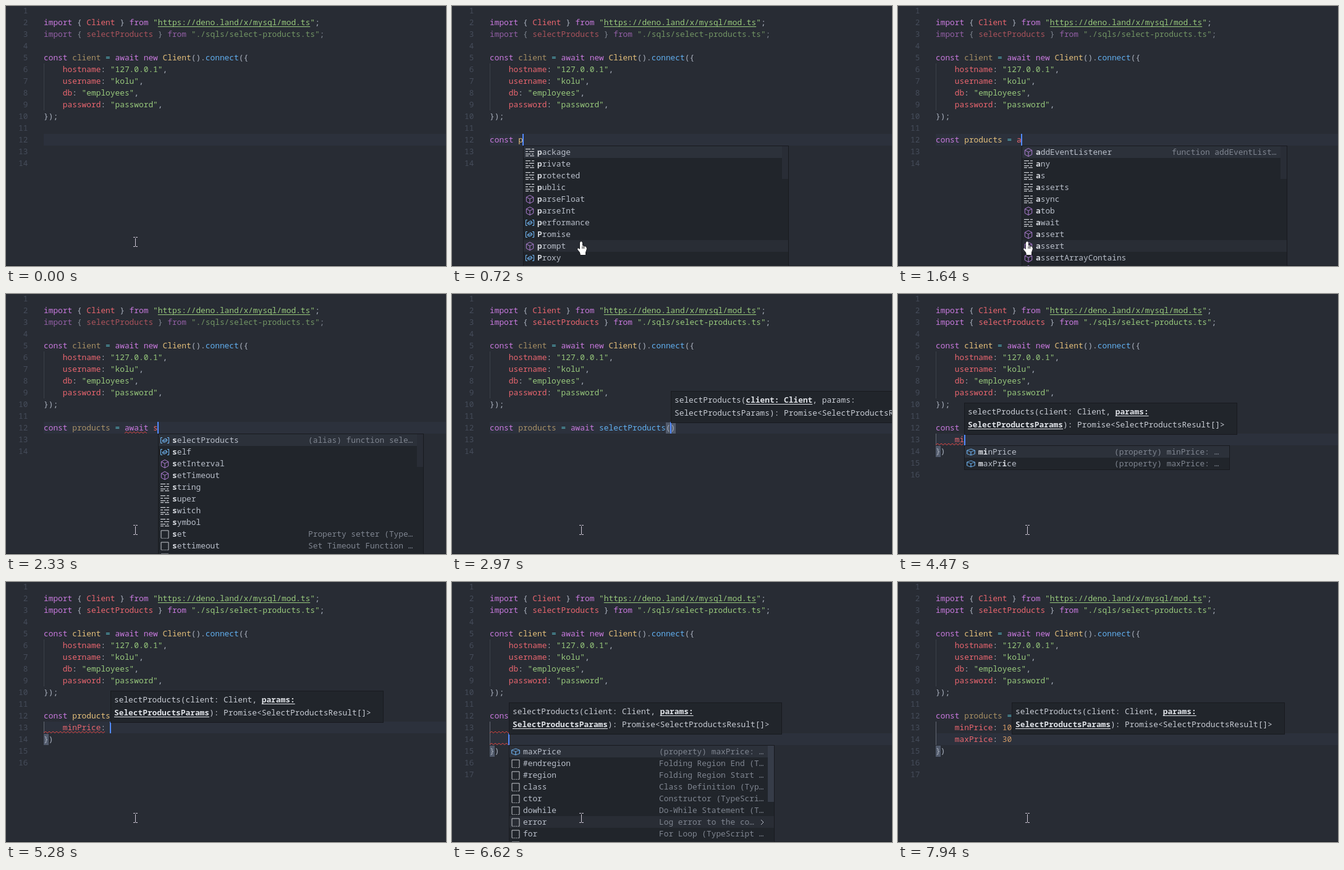
Recreate the animation shown at these times as an HTML page with a canvas. Size 712 by 421 pixels, loop 8 s.

```html
<!DOCTYPE html>
<html lang="en">
<head>
<meta charset="utf-8">
<title>Typing a typed query call</title>
<style>
html, body { margin: 0; width: 100%; height: 100%; overflow: hidden; background: #282c34; }
canvas { display: block; }
</style>
</head>
<body>
<canvas id="stage" width="712" height="421"></canvas>
<script>
const ctx = document.getElementById('stage').getContext('2d');
const LOOP = 8000, CW = 7.7, LH = 19, LEFT = 61;
const FONT = '12.83px "Noto Sans Mono", "DejaVu Sans Mono", monospace';
const COLORS = { K: '#c97adf', R: '#ea666f', G: '#98c97c', Y: '#e5c07b', B: '#61afef', T: '#56b6c2', O: '#d19a66', W: '#abb2bf' };

// Fixed lines: spans split by "|", first letter is the colour.
const HEAD = {
  2: 'Kimport |W{ |RClient|W } |Kfrom |G"https://deno.land/x/mysql/mod.ts"|W;',
  3: 'Kimport |W{ |RselectProducts|W } |Kfrom |G"./sqls/select-products.ts"|W;',
  5: 'Kconst |Yclient|T = |Kawait new |YClient|W().|Bconnect|W({',
  6: 'W    |Rhostname|W: |G"127.0.0.1"|W,',
  7: 'W    |Rusername|W: |G"kolu"|W,',
  8: 'W    |Rdb|W: |G"employees"|W,',
  9: 'W    |Rpassword|W: |G"password"|W,',
  10: 'W});'
};
const CALL = 'Kconst |Yproducts|T = |Kawait |BselectProducts|W(|Rclient|W, {';
const spans = s => s.split('|').map(p => [p[0], p.slice(1)]);

// Keystrokes: [time, inserted text]
const type = (str, ...times) => times.map((t, i) => [t, str[i]]);
const KEYS = [
  ...[...'const products'].map((c, i) => [340 + 57 * i, c]),
  ...type(' = await', 1250, 1370, 1480, 1600, 1720, 1800, 1900, 1990),
  ...type(' sele', 2180, 2290, 2370, 2400, 2440),
  [2630, 'ctProducts'], [2820, '('],
  ...type('client, {', 3280, 3360, 3430, 3490, 3550, 3590, 3970, 4010, 4060),
  [4120, '\n    '],
  ...type('min', 4280, 4420, 4560), [4780, 'Price'],
  ...type(': 10,', 5010, 5240, 5510, 5620, 5740),
  [5850, '\n    '],
  ...type('ma', 6660, 6730), [6890, 'xPrice'],
  ...type(': 30', 7040, 7200, 7630, 7700)
];

// Suggestions: [from, to, items]. Item: icon letter, label, optional "|detail"; *...* marks fixed bold.
const POPUPS = [
  [380, 625, 'kconst;kclass;kcontinue;kcase;kcatch;vclient;vClient;mclearInterval;mclearTimeout;mclose;mconfirm;vconsole'],
  [720, 1250, 'kpackage;kprivate;kprotected;kpublic;mparseFloat;mparseInt;vperformance;vPromise;mprompt;vProxy;vProgressEvent;vselectProducts'],
  [1640, 2180, 'maddEventListener|function addEventList…;kany;kas;kasserts;kasync;matob;kawait;massert;massert;massertArrayContains;massertEquals;massertMatch'],
  [2330, 2630, 'vselectProducts|(alias) function sele…;vself;msetInterval;msetTimeout;kstring;ksuper;kswitch;ksymbol;sset|Property setter (Type…;ssettimeout|Set Timeout Function …;sswitch case;mselectRole;mserverRelease;msessionRule;msendFile;msearchTitle;msetVisible'],
  [3320, 3970, 'vclient|   const client: Mysql;vClient;m*cle*ar*In*terval;vis*C*onso*leIn*stance;kclass;kconst;kcontinue;mclearTimeout;mclose;mconfirm;vconsole;vcrypto'],
  [4320, 4780, 'fminPrice|(property) minPrice: …;fmaxPrice|(property) maxPrice: …;smethod;simport statement'],
  [6390, 6890, 'fmaxPrice|(property) maxPrice: …;s#endregion|Folding Region End (T…;s#region|Folding Region Start …;sclass|Class Definition (Typ…;sctor|Constructor (TypeScri…;sdowhile|Do-While Statement (T…;serror|Log error to the co…;sfor|For Loop (TypeScript …;sforeach|For-Each Loop (TypeSc…;sforin|For-In Loop (TypeScri…;sfunction;sget']
];

const rowTop = row => (row - 1) * LH - 2;
const colX = col => LEFT + col * CW;
const within = (t, ...ranges) => ranges.some(([a, b]) => t >= a && t < b);

function rect(x, y, w, h, fill) {
  ctx.fillStyle = fill;
  ctx.fillRect(x, y, w, h);
}
function write(str, x, y, fill, bold) {
  ctx.fillStyle = fill;
  ctx.font = (bold ? 'bold ' : '') + FONT;
  [...str].forEach((c, i) => c !== ' ' && ctx.fillText(c, x + i * CW, y));
}
function code(row, col, color, str, alpha = 1) {
  ctx.globalAlpha = alpha;
  write(str, colX(col), rowTop(row) + 14, COLORS[color]);
  ctx.globalAlpha = 1;
}
function path(points, stroke, close) {
  ctx.beginPath();
  points.forEach(([x, y]) => ctx.lineTo(x, y));
  if (close) ctx.closePath();
  ctx.strokeStyle = stroke;
  ctx.stroke();
}
function squiggle(row, from, to) {
  const pts = [];
  for (let x = colX(from), i = 0; x <= colX(to); x += 3, i++) pts.push([x, rowTop(row) + (i % 2 ? 16 : 18.5)]);
  path(pts, '#dc4642');
}
function bracket(row, col) {
  rect(Math.round(colX(col)), rowTop(row) + 1, 8, LH - 1, '#515a6b');
}
function box(x, y, w, h) {
  rect(x, y, w, h, '#181a1f');
  rect(x + 1, y + 1, w - 2, h - 2, '#21252b');
}

function icon(kind, cx, cy) {
  ctx.save();
  ctx.translate(cx, cy);
  if (kind === 'm' || kind === 'f') {
    const color = kind === 'm' ? '#b180d7' : '#75beff';
    if (kind === 'f') ctx.scale(1.1, .78);
    path([[0, -6.5], [5.7, -3.5], [5.7, 3.5], [0, 6.5], [-5.7, 3.5], [-5.7, -3.5]], color, true);
    path([[-5.7, -3.5], [0, -.5], [5.7, -3.5]], color);
    path([[0, -.5], [0, 6.5]], color);
  } else if (kind === 'k') {
    [[-7, -6, 8], [3, -6, 4], [-7, -2, 4], [-1, -2, 8], [-7, 2, 8], [3, 2, 3], [-7, 5, 5], [0, 5, 7]]
      .forEach(([x, y, w]) => rect(x, y, w, 1.3, '#c5c8ce'));
  } else if (kind === 'v') {
    for (const s of [-1, 1]) path([[s * 4, -4.5], [s * 6.5, -4.5], [s * 6.5, 4.5], [s * 4, 4.5]], '#75beff');
    path([[-3.5, 0], [1, -3], [3.5, -1.5], [3.5, 1], [-1, 3.3], [-3.5, 2]], '#75beff', true);
    path([[-3.5, 0], [-1, 1.2], [3.5, -1.5]], '#75beff');
  } else {
    path([[-6, 6.5], [-6, -6], [6, -6], [6, 6.5]], '#c5c8ce');
    for (let x = -5; x < 6; x += 3) rect(x, 6, 1.5, 1, '#c5c8ce');
  }
  ctx.restore();
}

// Positions of the typed letters inside a label, or null when they do not fit.
function match(label, word) {
  const hits = new Set();
  let from = 0;
  for (const c of word.toLowerCase()) {
    const i = label.toLowerCase().indexOf(c, from);
    if (i < 0) return null;
    hits.add(i);
    from = i + 1;
  }
  return hits;
}
function parse(item, word) {
  const [label, detail] = item.slice(1).split('|');
  if (!label.includes('*')) return { kind: item[0], label, detail, hits: match(label, word) };
  const hits = new Set();
  let plain = '';
  label.split('*').forEach((part, i) => {
    for (const c of part) {
      if (i % 2) hits.add(plain.length);
      plain += c;
    }
  });
  return { kind: item[0], label: plain, detail, hits };
}

// Returns true when the pointer rests on the list.
function popup(list, word, x, row) {
  const items = list.split(';').map(s => parse(s, word)).filter(i => i.hits);
  if (!items.length) return false;
  const y = rowTop(row) + LH, shown = Math.min(items.length, 12), h = shown * LH + 2;
  const over = x < 209 && y + h > 382;
  const hover = over ? Math.floor((382 - y - 1) / LH) : -1;
  box(x, y, 430, h);
  items.slice(0, shown).forEach(({ kind, label, detail, hits }, i) => {
    const ry = y + 1 + i * LH, base = ry + 14;
    if (!i || i === hover) rect(x + 1, ry, 428, LH, i ? '#292d35' : '#2c313a');
    icon(kind, x + 11, ry + 10);
    [...label].forEach((c, j) => write(c, x + 23 + j * CW, base, hits.has(j) ? '#d7dae0' : '#b9bfca', hits.has(j)));
    if (detail) {
      write(detail, x + 243, base, '#7f8590');
      if (i === hover) path([[x + 408, ry + 6], [x + 412, ry + 10], [x + 408, ry + 14]], '#b9bfca');
    }
  });
  if (items.length > 9) rect(x + 419, y + 1, 10, row === 12 ? 53 : 91, row === 12 ? '#292d36' : '#363c48');
  return over;
}

function hint(x, row, second) {
  const y = rowTop(row) - 50, active = '#e0e3e8', plain = '#c8ccd4';
  box(x, y, 442, 52);
  const draw = (str, col, line, on) => {
    const tx = x + 6 + col * CW, ty = y + 19 + line * 21;
    write(str, tx, ty, on ? active : plain, on);
    if (on) rect(tx, ty + 2, str.length * CW, 1, active);
  };
  draw('selectProducts(', 0, 0);
  draw('client: Client', 15, 0, !second);
  draw(', ', 29, 0);
  draw('params:', 31, 0, second);
  draw('SelectProductsParams', 0, 1, second);
  draw('): Promise<SelectProductsResult[]>', 20, 1);
}

function pointer(hand) {
  if (!hand) {
    rect(209, 376, 1, 13, '#cfc8d6');
    for (const y of [374, 389]) {
      rect(206, y, 3, 1, '#cfc8d6');
      rect(210, y, 3, 1, '#cfc8d6');
    }
    return;
  }
  ctx.fillStyle = '#fff';
  path([[207, 383], [209, 381], [211, 383], [211, 388], [217, 390], [218, 393], [216, 399], [216, 403], [208, 403], [207, 399], [203, 394], [204, 392], [207, 394]], '#111', true);
  ctx.fill();
  for (const x of [211, 213.5]) path([[x, 389], [x, 393]], '#111');
}

function render(t) {
  const lines = KEYS.filter(k => k[0] <= t).map(k => k[1]).join('').split('\n');
  const n = lines.length, row = 11 + n, line = lines[n - 1], call = lines[0];
  const caret = colX(line.length);

  rect(0, 0, 712, 421, '#282c34');
  rect(LEFT, rowTop(row), 712 - LEFT, LH, '#2c313c');
  rect(0, 420, 712, 1, '#1d2026');
  rect(LEFT, rowTop(6), 1, 4 * LH, '#3b4048');
  if (n > 1) rect(LEFT, rowTop(13), 1, (n - 1) * LH, '#626772');

  const total = 14 + (n > 1 ? n : 0);
  for (let i = 1; i <= total; i++) write(String(i), 35.4 - CW * String(i).length, rowTop(i) + 14, '#454c5a');

  for (const r in HEAD) {
    let col = 0;
    for (const [c, s] of spans(HEAD[r])) {
      const dim = (r == 3 && t < 2800) || (s === 'client' && t < 4040);
      code(+r, col, c, s, dim ? .667 : 1);
      col += s.length;
    }
  }
  rect(colX(24), 33, 32 * CW, 1, COLORS.G);

  // Matching brackets and auto-closed ends
  const paren = call.indexOf('('), brace = call.indexOf('{');
  if (n > 1) {
    bracket(12, brace);
    bracket(12 + n, 0);
    code(12 + n, 0, 'W', '})');
  } else if (paren >= 0) {
    bracket(12, brace < 0 ? paren : brace);
    bracket(12, call.length);
    code(12, call.length, 'W', brace < 0 ? ')' : '})');
  }

  let col = 0;
  const unused = within(t, [2180, 5280], [5900, 7430], [7860, LOOP]);
  for (const [c, s] of spans(CALL)) {
    const part = s.slice(0, Math.max(0, call.length - col));
    const partial = part.length < s.trim().length && 'KB'.includes(c);
    code(12, col, partial ? 'R' : c, part, s === 'products' && unused ? .667 : 1);
    col += s.length;
  }
  lines.slice(1).forEach((s, i) => {
    for (const m of s.matchAll(/[a-z]+|\d+|[:,]/gi))
      code(13 + i, m.index, /[a-z]/i.test(m[0]) ? 'R' : /\d/.test(m[0]) ? 'O' : 'W', m[0]);
  });

  if (within(t, [2180, 2630])) squiggle(12, 17, 22);
  if (within(t, [3050, 3970])) squiggle(12, 23, call.length);
  const width = i => lines[i].trimEnd().length || 4;
  if (within(t, [4280, 6890], [7430, 7860])) squiggle(13, 0, width(1));
  if (within(t, [6120, 6890], [7430, 7860])) squiggle(14, 0, width(2));

  if (within(t, [150, 6120], [6320, 7470], [7630, 7900])) rect(Math.floor(caret), rowTop(row), 2, LH, '#528bff');

  const x = Math.round(caret);
  if (t >= 2900) hint(x, row, t >= 3970);
  const current = POPUPS.find(p => within(t, p));
  const over = current && popup(current[2], line.match(/\w*$/)[0], x, row);
  pointer(over && row === 12);
}

function tick() {
  render(performance.now() % LOOP);
  requestAnimationFrame(tick);
}
tick();
</script>
</body>
</html>
```
